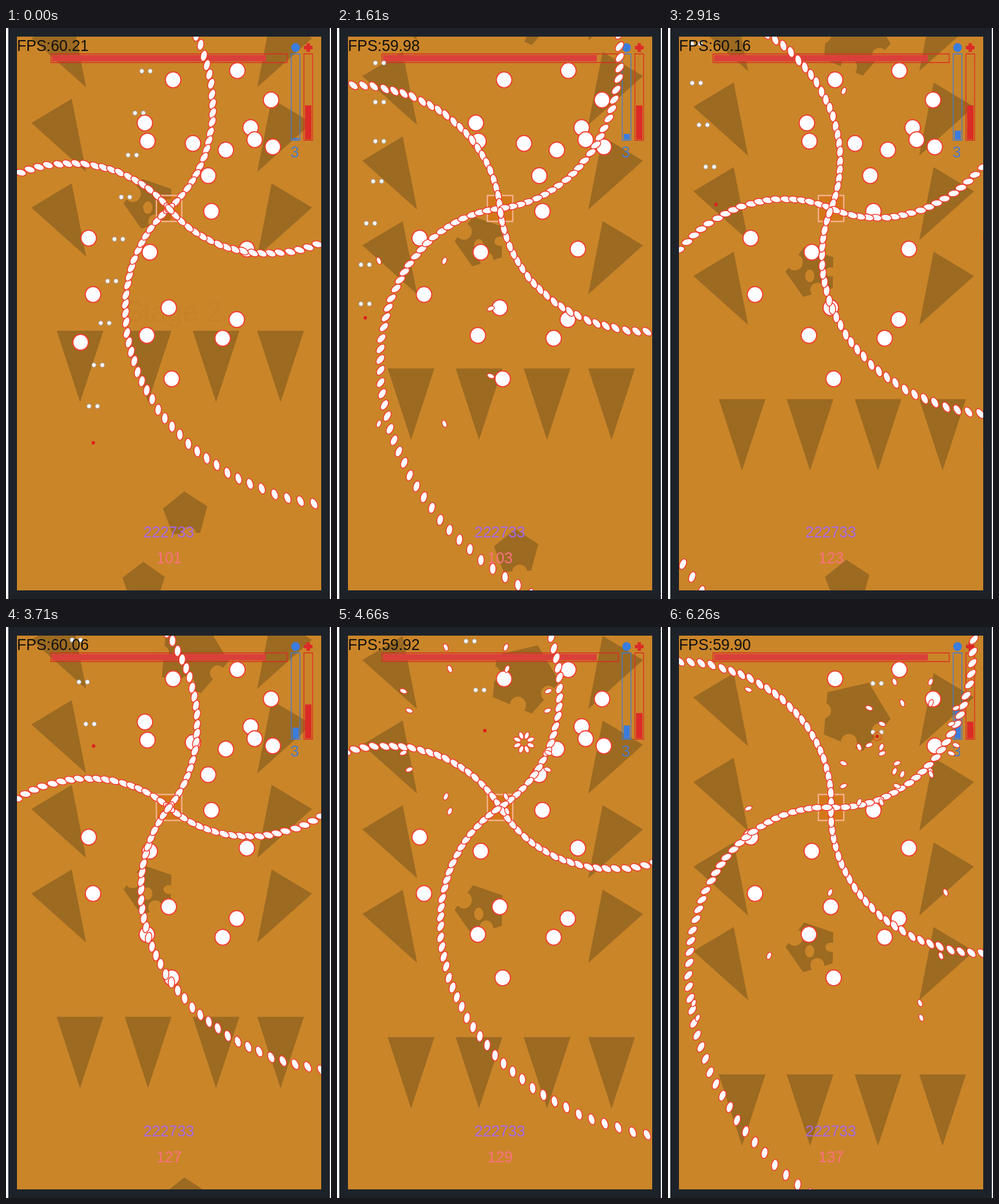
These frames come from a looping animation (564x992 px, 6.33 s). An HTML page with a canvas:

```html
<!DOCTYPE html>
<html lang="en">
<head>
<meta charset="utf-8">
<title>Bullet pattern</title>
<style>
html, body { margin: 0; width: 100%; height: 100%; overflow: hidden; background: #fff; }
canvas { display: block; }
</style>
</head>
<body>
<canvas id="stage" width="564" height="992"></canvas>
<script>
const ctx = document.getElementById('stage').getContext('2d');
const LOOP = 6330, STEPS = 87, TAU = Math.PI * 2, RAD = Math.PI / 180;
const GROUND = '#ca8529', SHADE = '#9c6a21', EDGE = '#f33c30', RED = '#dc2a26', BLUE = '#3b7cdc';
const TALL = 1.03;            // the picture is slightly taller than wide
const SPEED = 2.793;          // bullet pixels per tick, across
const PACE = 2.85;            // player pixels per tick
const TRIGGER = 74;           // a bomb bursts when the player is this near
const SHOT_GAP = 5.9;
const CORE = { x: 283, y: 313.5 };

const bombs = [
  [290, 90], [401.5, 74], [460, 125], [241, 165], [424.5, 173], [431.5, 194],
  [463, 206.5], [245.5, 196.5], [324.5, 200.5], [381.5, 212], [351, 256.5],
  [356.5, 318.5], [418, 384], [249.5, 389.5], [143.5, 365], [151, 463],
  [282.5, 486], [400.5, 506.5], [376, 539], [244.5, 534], [129.5, 546], [287.5, 609.5]
].map(([x, y]) => ({ x, y }));

// Corners of the player's route, with a wait in ticks at some of them
const route = [
  [296, 886], [151.5, 741], [151.5, 706], [74, 628], [74, 555], [49, 530], [49, 342],
  [84, 306], [84, 275], [152, 207], [152, 180, 1], [256.5, 180, 9], [328, 180],
  [346.5, 163, 27], [363, 179], [363, 190]
];

function playerAt(tick) {
  let left = tick + 79;
  for (let i = 1; i < route.length; i++) {
    const [x0, y0] = route[i - 1], [x1, y1, wait = 0] = route[i];
    const time = Math.hypot(x1 - x0, y1 - y0) / PACE;
    if (left < time) {
      const f = Math.max(0, left / time);
      return { x: x0 + f * (x1 - x0), y: y0 + f * (y1 - y0) };
    }
    left -= time;
    if (left < wait) return { x: x1, y: y1 };
    left -= wait;
  }
  const [x, y] = route[route.length - 1];
  return { x, y };
}

for (const b of bombs) {
  b.burst = Infinity;
  for (let t = 0; t < 350 && b.burst === Infinity; t += 0.5) {
    const p = playerAt(t);
    if (Math.hypot(p.x - b.x, p.y - b.y) < TRIGGER) b.burst = t;
  }
}

// Readouts: from step, frame rate, counter
const readouts = [
  [0, '60.21', 101], [22, '59.98', 103], [40, '60.16', 123], [51, '60.06', 127],
  [64, '59.92', 129], [76, '60.17', 133], [86, '59.90', 137]
];

// The game runs evenly but loses a few ticks in one hitch
const tickAt = step => Math.round(step * 4.125 - (step > 57 ? 5.5 : 0));

function paint(fill, stroke, width) {
  if (fill) { ctx.fillStyle = fill; ctx.fill(); }
  if (stroke) { ctx.strokeStyle = stroke; ctx.lineWidth = width; ctx.stroke(); }
}

function ellipse(x, y, rx, ry, angle, ...style) {
  ctx.beginPath();
  ctx.ellipse(x, y, rx, ry, angle, 0, TAU);
  paint(...style);
}

const disc = (x, y, r, ...style) => ellipse(x, y, r, r * TALL, 0, ...style);

function rect(x, y, w, h, ...style) {
  ctx.beginPath();
  ctx.rect(x, y, w, h);
  paint(...style);
}

function poly(...xy) {
  ctx.beginPath();
  for (let i = 0; i < xy.length; i += 2) ctx.lineTo(xy[i], xy[i + 1]);
  paint(SHADE);
}

function pentagon(x, y, r, turn) {
  const xy = [];
  for (let i = 0; i < 5; i++) {
    const a = (turn + 72 * i) * RAD;
    xy.push(x + r * Math.cos(a), y + r * Math.sin(a));
  }
  poly(...xy);
}

function bullet(from, r, degrees, long, wide, line) {
  const a = degrees * RAD;
  ellipse(from.x + r * Math.cos(a), from.y + r * TALL * Math.sin(a), long, wide, a, '#fff', EDGE, line);
}

function text(str, x, y, color, align = 'center', size = 26.4) {
  ctx.save();
  ctx.translate(x, y);
  ctx.scale(1, TALL);
  ctx.font = size + 'px "Liberation Sans", Arial, sans-serif';
  ctx.textAlign = align;
  ctx.fillStyle = color;
  ctx.fillText(str, 0, 0);
  ctx.restore();
}

function scenery(tick) {
  ctx.save();
  ctx.translate(0, tick * 0.72);
  pentagon(249.5, 305.5, 45.5, 181);
  disc(220, 288, 14, GROUND);
  ellipse(246, 312, 8, 11, 0, GROUND);
  disc(259, 336, 12, GROUND);
  ellipse(283, 305, 10, 8, 0, GROUND);

  pentagon(311.5, 845.5, 40.5, -93);
  disc(317, 880, 13, GROUND);
  pentagon(239, 966, 38.5, -91);

  pentagon(324, -97, 62.5, 5);
  disc(270, -106, 13, GROUND);
  disc(314, -51, 14, GROUND);
  disc(367, -71, 13, GROUND);

  for (let i = 0; i < 4; i++) {
    const y = 270 - 147 * i;
    poly(44, y + 42, 114, y, 139, y + 127);
    poly(531, y + 42, 461, y, 436, y + 127);
  }
  for (const x of [88, 206, 324, 436]) poly(x, 526, x + 81, 526, x + 40.5, 650);
  ctx.restore();
}

function hud(tick, count) {
  rect(78, 45, 410, 15, null, RED, 1.3);
  rect(80, 47, 371, 11, '#da403a');
  rect(495, 45, 15, 150, null, BLUE, 1.3);
  rect(517, 45, 15, 150, null, RED, 1.3);
  const charge = 2.5 + 0.077 * tick + 0.23 * Math.max(0, tick - 268);
  rect(497.5, 193.5 - charge, 10.5, charge, BLUE);
  const hits = (tick > 235) + (tick > 332);
  rect(519, 134.5 + 15 * hits, 11, 59 - 15 * hits, RED);
  disc(502.5, 34, 7.5, BLUE);
  rect(517, 31, 15, 6, RED);
  rect(521.5, 26.5, 6, 15, RED);
  text('3', 501, 224.5, '#4a7cc6');
  text('222733', 282.5, 884.7, '#a567e4');
  text(count, 283, 929.7, '#fb7180');
}

function player(tick) {
  const first = Math.floor((tick + 5.5) / SHOT_GAP);
  for (let k = first; k > first - 14; k--) {
    const born = SHOT_GAP * k - 5.5, from = playerAt(born);
    const y = from.y - (tick - born) * SPEED * TALL * 5;
    for (const dx of [-7.4, 7.2]) disc(from.x + dx, y, 3.6, '#fff', '#a3adc4', 1);
  }
  const p = playerAt(tick);
  disc(p.x, p.y, 3, '#dd2020');
  if (tick > 304) disc(p.x, p.y, Math.max(7.5, 14 - (tick - 304) * 0.2), null, 'rgba(228,52,30,.75)', 1.2);
}

// Four arms; each shot turns two degrees, on the first whole tick after 5.25
function spiral(tick) {
  const last = Math.floor((tick - 4.3) / 5.25);
  for (let k = last - 56; k <= last; k++) {
    const r = (tick - 4.3 - Math.ceil(5.25 * k)) * SPEED;
    if (r < 0) continue;
    for (let arm = 0; arm < 4; arm++) bullet(CORE, r, 141.2 + 2 * k + 90 * arm, 9.7, 5.6, 1.6);
  }
}

function bursts(tick) {
  for (const b of bombs) {
    if (tick < b.burst) continue;
    for (let i = 0; i < 8; i++) bullet(b, (tick - b.burst) * SPEED * 1.5, 22.5 + 45 * i, 6.5, 3.8, 1.4);
  }
}

function draw(ms) {
  const step = Math.min(STEPS - 1, Math.floor(ms / LOOP * STEPS + 0.1));
  const tick = tickAt(step);
  const [, fps, count] = readouts.filter(r => r[0] <= step).pop();
  rect(0, 0, 564, 992, '#fff');
  rect(4, 0, 558, 992, '#1d2229');
  ctx.save();
  ctx.beginPath();
  ctx.rect(19, 15, 528, 962);
  ctx.clip();
  rect(19, 15, 528, 962, GROUND);
  scenery(tick);
  const fade = Math.max(0, 0.12 - tick * 0.0014);
  text('Stage 2', 290, 510, `rgba(178,108,30,${fade})`, 'center', 49);
  hud(tick, count);
  player(tick);
  rect(261, 291, 44, 45, 'rgba(222,100,0,.4)', '#f5b18c', 2.4);
  for (const b of bombs) {
    if (tick < b.burst) disc(b.x, b.y, 13.4, '#fff', EDGE, 2);
  }
  spiral(tick);
  bursts(tick);
  text('FPS:' + fps, 19, 40, '#111', 'left');
  ctx.restore();
}

const start = performance.now();
function frame() {
  draw((performance.now() - start) % LOOP);
  requestAnimationFrame(frame);
}
frame();
</script>
</body>
</html>
```
